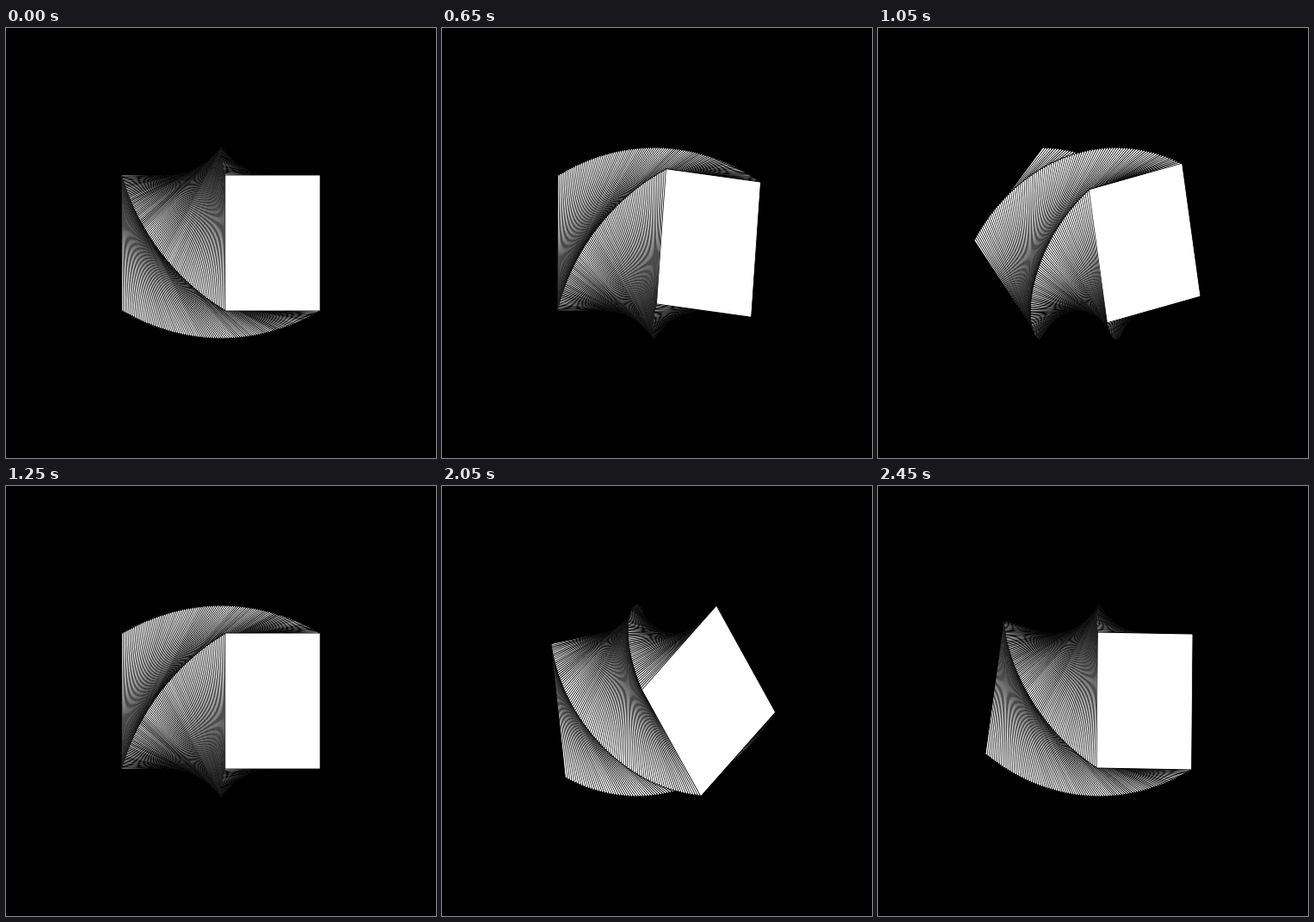
These frames come from a looping animation (500x500 px, 2.5 s). An HTML page with a canvas:

```html
<!DOCTYPE html>
<html lang="en">
<head>
<meta charset="utf-8">
<title>Twisting prism</title>
<style>
  html, body { margin: 0; width: 100%; height: 100%; overflow: hidden; background: #000; }
  canvas { display: block; width: 500px; height: 500px; }
</style>
</head>
<body>
<canvas id="stage" width="500" height="500"></canvas>
<script>
const ctx = document.getElementById('stage').getContext('2d');
const LOOP = 2500, STEP = 50;
const SLICES = 100;
const SIDE = 158, SQUASH = 0.7;
const BACK = 190, DEPTH = 120, MID = 250;
const QUARTER = Math.PI / 2;

// The squash applies to the outline too, so upright edges get thinner lines.
function slice(x, angle) {
  ctx.setTransform(SQUASH, 0, 0, 1, x, MID);
  ctx.rotate(angle);
  ctx.beginPath();
  ctx.rect(-SIDE / 2, -SIDE / 2, SIDE, SIDE);
  ctx.fill();
  ctx.stroke();
}

function draw(ms) {
  const phase = 2 * Math.PI * ms / LOOP;
  const back = -QUARTER * Math.sin(phase);
  const front = -QUARTER * Math.cos(phase);

  ctx.resetTransform();
  ctx.fillStyle = '#000';
  ctx.fillRect(0, 0, 500, 500);
  ctx.fillStyle = '#fff';
  ctx.strokeStyle = '#000';
  ctx.lineWidth = 1;
  for (let i = 0; i < SLICES; i++) {
    const u = i / (SLICES - 1);
    slice(BACK + DEPTH * u, back + (front - back) * u);
  }
}

const start = performance.now();
let shown = -1;

function tick() {
  const ms = (performance.now() - start) % LOOP;
  const held = Math.floor(ms / STEP) * STEP;
  if (held !== shown) draw(shown = held);
  requestAnimationFrame(tick);
}
tick();
</script>
</body>
</html>
```
